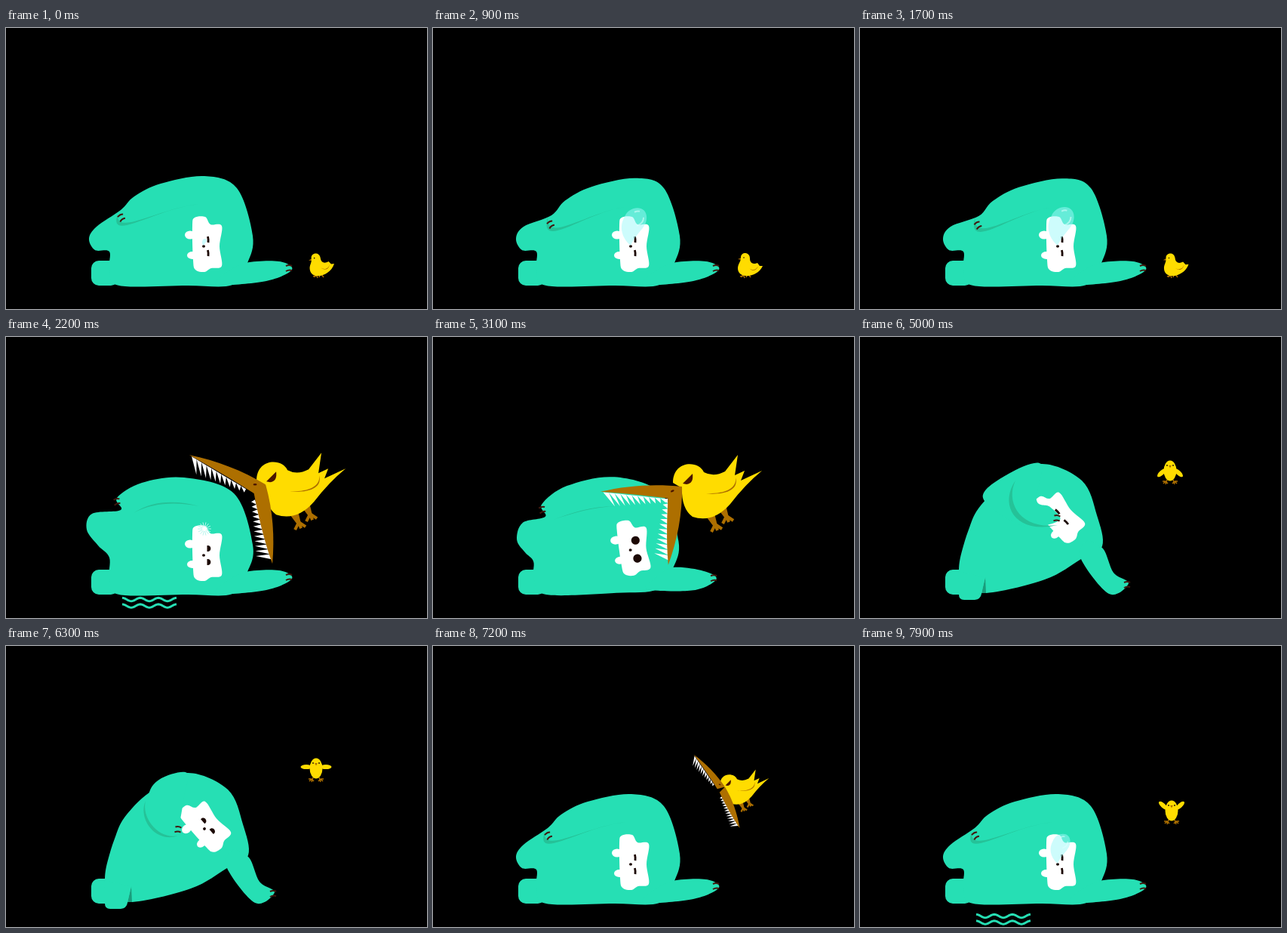
An HTML page with a canvas that plays this animation: 558 by 372 pixels, repeating every 8000 ms.

```html
<!DOCTYPE html>
<html lang="en">
<head>
<meta charset="utf-8">
<title>Sleepy bear and chick</title>
<style>
html, body { margin: 0; width: 100%; height: 100%; overflow: hidden; background: #000; }
canvas { display: block; }
</style>
</head>
<body>
<canvas id="stage" width="558" height="372"></canvas>
<script>
const ctx = document.getElementById('stage').getContext('2d');
const LOOP = 8000, STEP = 100, TAU = Math.PI * 2;
const GREEN = '#26dfb4', SHADE = '#25c298', DEEP = '#1a9c7b', CLAW = '#42180f';
const YELLOW = '#ffdc00', BROWN = '#ad6f00', INK = '#1c0905', LID = '#4a1500';

const clamp = k => Math.min(1, Math.max(0, k));
const ease = k => (k = clamp(k), k * k * (3 - 2 * k));
// Blends numbers, lists and objects alike
const mix = (a, b, k) =>
  typeof a === 'number' ? a + (b - a) * k :
  Array.isArray(a) ? a.map((v, i) => mix(v, b[i], k)) :
  Object.fromEntries(Object.keys(a).map(n => [n, mix(a[n], b[n], k)]));
// Eased value from rows of [time, value]
const track = (rows, t) => rows.slice(1).reduce(
  (v, [time, next], i) => mix(v, next, ease((t - rows[i][0]) / (time - rows[i][0]))), rows[0][1]);

const fill = (path, color) => {
  ctx.fillStyle = color;
  ctx.fill(typeof path === 'string' ? new Path2D(path) : path);
};
const stroke = (path, color, width) => {
  ctx.strokeStyle = color;
  ctx.lineWidth = width;
  ctx.stroke(typeof path === 'string' ? new Path2D(path) : path);
};
const oval = (x, y, rx, ry, color) => {
  const path = new Path2D();
  path.ellipse(x, y, rx, ry, 0, 0, TAU);
  fill(path, color);
};
const place = (x, y, deg, scale, draw) => {
  ctx.save();
  ctx.translate(x, y);
  ctx.rotate(deg * Math.PI / 180);
  ctx.scale(scale, scale);
  draw();
  ctx.restore();
};
// Closed smooth curve through key points
function blob(points, color) {
  const n = points.length, at = i => points[(i + n) % n];
  const path = new Path2D();
  path.moveTo(...at(0));
  for (let i = 0; i < n; i++) {
    const [a, b, c, d] = [at(i - 1), at(i), at(i + 1), at(i + 2)];
    path.bezierCurveTo(b[0] + (c[0] - a[0]) / 6, b[1] + (c[1] - a[1]) / 6,
      c[0] - (d[0] - b[0]) / 6, c[1] - (d[1] - b[1]) / 6, ...c);
  }
  fill(path, color);
}
// Sliver between a curve and the same curve drawn closer to its chord
function crescent([from, c1, c2, to], color, depth = .2) {
  const path = new Path2D();
  path.moveTo(...from);
  path.bezierCurveTo(...c1, ...c2, ...to);
  path.bezierCurveTo(...mix(c2, mix(from, to, 2 / 3), depth),
    ...mix(c1, mix(from, to, 1 / 3), depth), ...from);
  fill(path, color);
}

// Torso runs from the foot up over the back and down to the belly
const BELLY = [[327, 275], [320, 311], [300, 340], [240, 341], [150, 341]];
const REST = {
  torso: [[137, 320], [137, 296], [118, 294], [110, 279], [120, 263], [152, 241],
    [170, 223], [205, 206], [263, 196], [306, 212], ...BELLY],
  arm: [[290, 325], [318, 311], [362, 309], [379, 320], [345, 335], [280, 340]],
  shade: [[148, 246], [135, 285], [195, 240], [256, 233]],
  face: [262, 289, 0], right: [375, 318], left: [153, 251, -28]
};
const SUNK = { ...REST,
  torso: REST.torso.map(([x, y], i) => i > 4 && i < 9 ? [x + 5, y + 14 - 1.4 * i] : [x, y]),
  shade: [[152, 250], [140, 296], [200, 245], [254, 237]],
  left: [156, 260, -28]
};
const SHOCK = { ...REST,
  torso: [[137, 320], [137, 292], [122, 276], [107, 255], [114, 234], [152, 229],
    [147, 213], [180, 193], [236, 186], [302, 207], ...BELLY],
  shade: [[169, 233], [195, 216], [225, 216], [256, 224]],
  left: [147, 218, -10]
};
const RISE = {
  torso: [[126, 320], [125, 309], [121, 304], [120, 297], [129, 272], [142, 257],
    [138, 240], [172, 206], [250, 184], [303, 207], [322, 260], [315, 293], [292, 321], [250, 334], [150, 341]],
  arm: [[300, 310], [315, 293], [350, 311], [368, 322], [345, 336], [292, 321]],
  shade: [[140, 261], [160, 268], [190, 238], [222, 224]],
  face: [261, 267, -20], right: [366, 322], left: [140, 252, -15]
};
const SIT = {
  torso: [[131, 320], [131, 310], [131, 308], [132, 297], [136, 280], [144, 255],
    [157, 227], [190, 194], [240, 168], [294, 190], [314, 236], [321, 277], [293, 294], [245, 321], [163, 339]],
  arm: [[300, 270], [322, 280], [336, 312], [356, 326], [330, 340], [293, 294]],
  face: [263, 242, -40], right: [354, 328]
};
// Raised paw: over the eyes, and pulled away
const COVER = {
  paw: [[240, 168], [197, 181], [163, 213], [215, 250], [264, 243], [252, 225], [234, 216]],
  shade: [[206, 190], [184, 222], [205, 262], [262, 249]], left: [261, 240, 8]
};
const PEEK = {
  paw: [[240, 168], [206, 175], [189, 197], [192, 240], [226, 250], [230, 235], [236, 200]],
  shade: [[185, 205], [174, 230], [200, 262], [228, 251]], left: [228, 243, 8]
};
const HEAD = [[-15, -27], [-12, -38], [2, -39], [9, -29], [24, -27], [21, 0],
  [24, 26], [10, 29], [1, 34], [-11, 31], [-14, 18]];

function bearPose(t, paw) {
  const breath = t < 2000 ? (1 - Math.cos(t / 1350 * Math.PI)) / 1.5 : 0;
  const sit = { ...SIT, shade: paw.shade, left: paw.left };
  return track([[1800, mix(REST, SUNK, breath)], [2100, SHOCK], [2800, SHOCK], [3600, RISE],
    [3800, RISE], [4500, sit], [6400, sit], [7200, REST]], t);
}

function claws(x, y, deg = 0) {
  place(x, y, deg, 1, () => stroke('M-4 -3Q0 -5 4 -3M-4 4Q0 1.5 4 3', CLAW, 2));
}

function face(t, [x, y, deg], lift) {
  const open = t >= 3000 && t < 4300;
  const half = (t >= 2100 && t < 3000) || (t >= 4300 && t < 6700 && lift > .3);
  place(x, y, deg, 1, () => {
    blob(HEAD, '#fff');
    oval(-18, -15, 7, 5.5, '#fff');
    oval(-15, 12, 7, 5, '#fff');
    for (const side of [-1, 1]) {
      const ey = 9 * side;
      if (open) oval(8, 12 * side, 5.6, 5.6, INK);
      else if (half) fill(`M4.5 ${ey - 4}C11 ${ey - 5} 11 ${ey + 5} 4.5 ${ey + 4}Z`, INK);
      else stroke(`M5.5 ${ey - 4}Q6.5 ${ey} 6 ${ey + 4}`, INK, 2.8);
    }
    oval(0, 0, 2, 1.8, INK);
  });
}

function bubble(age) {
  place(262, 288, 0, .18 + .85 * ease(age / 1000), () => {
    fill('M0 0C-13 -11 -15 -26 -8 -38C-2 -53 21 -54 21 -37C21 -23 8 -18 0 0Z', 'rgba(160,250,250,.52)');
    stroke('M8 -26Q17 -29 17 -37M5 -44Q9 -46 12 -45', 'rgba(225,255,255,.55)', 2);
  });
}

function pop(age) {
  const path = new Path2D();
  for (let a = 0; a < TAU; a += TAU / 14) {
    for (const [r, draw] of [[3, 'moveTo'], [6 + age / 35, 'lineTo']])
      path[draw](263 + r * Math.cos(a), 254 + r * Math.sin(a));
  }
  stroke(path, '#b9f6ee', 1);
}

function bear(t) {
  const lift = t < 5500 ? 1 - ease((t - 4500) / 300) + ease((t - 5100) / 400)
    : .65 + .35 * Math.cos((t - 5500) / 400 * TAU);
  const paw = mix(COVER, PEEK, lift), p = bearPose(t, paw);
  const seated = t >= 4300 && t < 6700;
  const foot = new Path2D();
  foot.roundRect(113, 308, 36, 33, 10);
  fill(foot, GREEN);
  blob(p.torso, GREEN);
  blob(p.arm, GREEN);
  if (t >= 3500 && t < 4000) crescent([[124, 311], [138, 325], [150, 320], [157, 299]], DEEP, .35);
  if (seated) {
    fill('M166 318L161 339L167 339Z', DEEP);
    fill('M131 310V341Q131 348 138 348H152Q160 347 161 340L166 318Z', GREEN);
  }
  face(t, p.face, lift);
  if (seated) blob(paw.paw, GREEN);
  crescent(p.shade, SHADE);
  claws(...p.right);
  claws(...p.left);
  if (t < 2100) bubble(t);
  else if (t < 2400) pop(t - 2100);
  else if (t >= 7300) bubble(t - 7250);
}

// Tremor lines on the floor
function waves(age) {
  if (age < 0 || age > 600) return;
  for (const row of [347.5, 356]) {
    const path = new Path2D(), y = row + Math.max(0, age - 200) / 40;
    for (let x = 0; x <= 72; x += 2) path.lineTo(154 + x, y - 2.2 * Math.cos(x / 24 * TAU));
    stroke(path, GREEN, 3);
  }
}

// A row of teeth pointing along (dx, dy), longest at its end
function teeth(n, [x1, y1], [x2, y2], dx, dy) {
  const sx = (x2 - x1) / n, sy = (y2 - y1) / n;
  for (let i = 0; i < n; i++) {
    const x = x1 + sx * i, y = y1 + sy * i, k = .3 + .7 * i / (n - 1);
    fill(`M${x} ${y}L${x + sx} ${y + sy}L${x + sx / 2 + dx * k} ${y + sy / 2 + dy * k}Z`, '#fff');
  }
}

function bird(age, life) {
  const gone = ease((age - life + 300) / 300);
  const swoop = 57 * Math.exp(-Math.max(0, age - 100) / 143);
  const bite = 35 * Math.cos((age - 100) / 800 * TAU);
  const scale = mix(Math.min(1, .55 + age / 200), .3, gone);
  place(mix(330 + swoop, 402, gone), mix(198 - swoop / 5, 185, gone), 0, scale, () => {
    ctx.save();
    ctx.translate(-344, -195);
    for (const [x, y] of [[383, 234], [398, 223]]) {
      fill(`M${x - 9} ${y - 2}L${x + 3} ${y - 8}L${x + 8} ${y + 13}L${x + 3} ${y + 14}Z`, BROWN);
      stroke(`M${x + 5} ${y + 11}L${x} ${y + 21}M${x + 5} ${y + 11}L${x + 8} ${y + 19}M${x + 5} ${y + 11}L${x + 14} ${y + 17}`, BROWN, 4);
    }
    fill('M332 190C332 160 366 160 373 176Q386 183 401 175L418 153L414 180L427 174L422 187L450 174Q428 192 408 218Q385 244 358 235Q343 224 344 197Z', YELLOW);
    crescent([[373, 204], [400, 207], [420, 200], [415, 183]], BROWN, .15);
    fill('M345 191L358 178C359 186 357 191 350 192Z', LID);
    ctx.restore();
    place(0, 0, -.6 * bite, 1, () => {
      teeth(12, [-14, 20], [8, 99], -20, -1);
      fill('M0 0L-16 9C-10 40 -2 75 9 105C12 70 10 35 0 0Z', BROWN);
    });
    place(0, 0, bite, 1, () => {
      teeth(11, [-26, 6], [-98, -37], 3, 22);
      fill('M-101 -39C-65 -32 -30 -18 0 0L-15 12C-40 -4 -70 -22 -101 -39Z', BROWN);
      oval(-14, 0, 2.5, 1.3, LID);
    });
  });
}

function beak() {
  place(391, 185, -16, 1, () => {
    teeth(10, [8, -2], [35, 0], 1, -8);
    teeth(10, [8, 2], [35, 0], 1, 6);
    fill('M-2 0L2 -5L10 -4L36 0L12 5L3 6Z', BROWN);
  });
}

function groundChick(t) {
  stroke('M411 325L409 330M411 326L413 331M417 325L415 330M417 325L421 330M407 329L411 328', BROWN, 1.5);
  place(415, 328, -4 - 4 * Math.cos(t / 300 * Math.PI), 1, () => {
    ctx.translate(-415, -328);
    fill('M409 304L404 306L409 307Z', BROWN);
    fill('M408 304C408 296 420 296 420 305C420 312 425 313 430 311L433 315L437 315C430 331 404 333 404 318C404 312 408 310 408 304Z', YELLOW);
    crescent([[419, 318], [424, 323], [429, 321], [431, 315]], BROWN);
    oval(412, 304, .8, .8, INK);
  });
}

function flyingChick(t) {
  const y = track([[3900, 181], [5000, 177], [6300, 162], [7000, 162], [7900, 218]], t);
  const flap = .75 * Math.cos((t - 5000) / 306 * TAU);
  place(411 + 2 * ease((t - 7000) / 900), y, 0, 1, () => {
    for (const side of [-1, 1]) {
      ctx.save();
      ctx.scale(side, 1);
      stroke('M4 12L6 18M6 14L9 17M6 14L3 17M6 14L10 14', BROWN, 1.5);
      ctx.translate(6, -2);
      ctx.rotate(flap);
      oval(7, 0, 7.5, 3, YELLOW);
      ctx.restore();
    }
    oval(0, 0, 8.5, 13.5, YELLOW);
    oval(-4, -7, .9, .9, INK);
    oval(4, -7, .9, .9, INK);
    fill('M-1.8 -7H1.8L0 -3.5Z', BROWN);
  });
}

function draw(t) {
  ctx.fillStyle = '#000';
  ctx.fillRect(0, 0, 558, 372);
  bear(t);
  waves(t - 2000);
  waves(t - 7300);
  if (t < 1900) groundChick(t);
  else if (t < 3800) bird(t - 1900, 1900);
  else if (t < 3900) beak();
  else if (t >= 7200 && t < 7800) bird(t - 7200, 600);
  else flyingChick(t);
}

const start = performance.now();
function tick() {
  const t = (performance.now() - start) % LOOP;
  draw(Math.floor(t / STEP) * STEP);
  requestAnimationFrame(tick);
}
tick();
</script>
</body>
</html>
```
